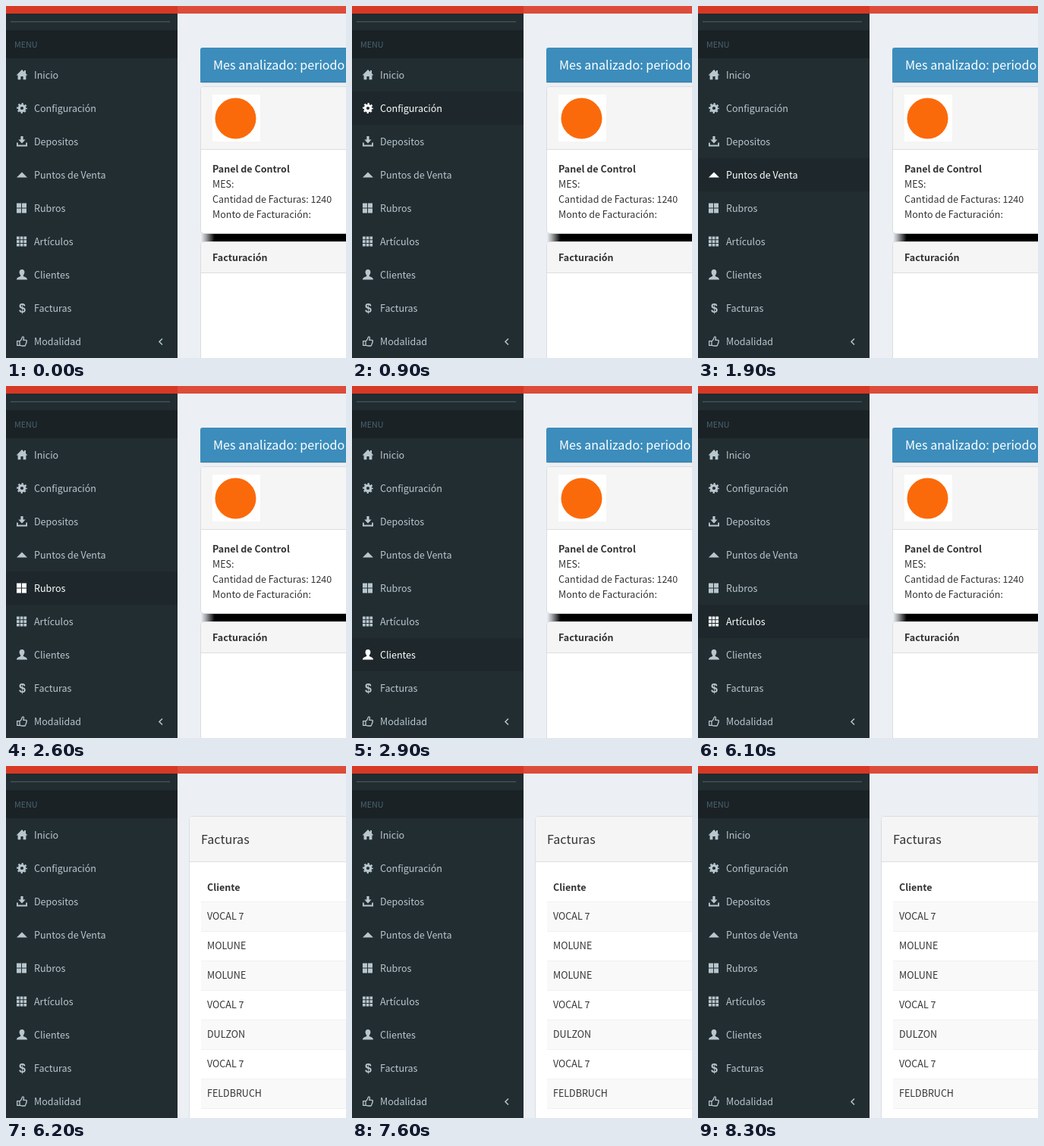
These frames come from a looping animation (448 by 465 pixels, 8500 ms). An HTML page:

```html
<!DOCTYPE html>
<html lang="es">
<head>
<meta charset="utf-8">
<title>Panel de Control</title>
<style>
  html, body { margin: 0; width: 100%; height: 100%; overflow: hidden; background: #ecf0f5; }
  svg { display: block; }
  text {
    font-family: "Noto Sans CJK JP", "Noto Sans CJK SC", "Noto Sans CJK KR", "Noto Sans CJK", "Noto Sans", sans-serif;
    fill: #333; white-space: pre;
  }
  .bold { font-weight: 700; }
  .item { color: #b8c7ce; }
  .item text { fill: currentColor; }
  .item .back { fill: none; }
  .item.on { color: #fff; }
  .item.on .back { fill: #1e282c; }
  .icon { fill: currentColor; }
  .line { fill: none; stroke: currentColor; }
  .icon .usd { font: bold 16px "Liberation Sans", Arial, sans-serif; }
</style>
</head>
<body>
<svg id="stage" width="448" height="465" viewBox="0 0 448 465">
  <defs>
    <linearGradient id="fade">
      <stop offset="0" stop-color="#ecf0f5"/>
      <stop offset=".35" stop-color="#a4a6a9"/>
      <stop offset="1" stop-color="#000"/>
    </linearGradient>
  </defs>
  <rect width="448" height="465" fill="#ecf0f5"/>
  <g id="home"></g>
  <g id="bills"></g>
  <rect width="448" height="10" fill="#dd4b39"/>
  <rect width="226" height="10" fill="#d73925"/>
  <rect y="10" width="226" height="455" fill="#222d32"/>
  <rect x="6" y="20" width="210" height="1.5" fill="#425057"/>
  <rect y="32" width="226" height="37" fill="#1a2226"/>
  <g id="menu"></g>
</svg>
<script>
const LOOP = 8500;
const BILLS_AT = 6200;
const ARROW_BACK = 6400;
const ROW = 44;

// [start in ms, hovered menu row or -1]
const HOVER = [
  [0, -1], [800, 0], [900, 1], [1700, 2], [1900, 3], [2400, 4], [2700, 5],
  [2900, 6], [3300, 7], [5100, 6], [5500, 5], [6200, -1]
];

const byId = id => document.getElementById(id);

// Latin letters of this face run 1.117 times larger than the nominal size.
const label = (x, y, str, size = 14, attrs = "") =>
  `<text x="${x}" y="${y}" font-size="${(size / 1.117).toFixed(2)}" ${attrs}>${str}</text>`;
const box = (x, y, w, h, fill, attrs = "") =>
  `<rect x="${x}" y="${y}" width="${w}" height="${h}" fill="${fill}" ${attrs}/>`;
const shape = d => `<path d="${d}"/>`;

function tiles(count, size, step) {
  let d = "";
  for (let i = 0; i < count * count; i++)
    d += `M${i % count * step} ${Math.floor(i / count) * step + .5}h${size}v${size}h${-size}z`;
  return shape(d);
}

// Icons live in a 14 by 14 square.
const ICONS = {
  house: shape("M7 0L10 3V1H12V5L14.4 7.6H12.4V13.2H8.6V9H5.4V13.2H1.6V7.6H-.4Z"),
  cog: `<circle class="line" cx="7" cy="7" r="3.7" stroke-width="3.2"/>
    <circle class="line" cx="7" cy="7" r="5.8" stroke-width="2.2" stroke-dasharray="2.278" stroke-dashoffset="1.139"/>`,
  save: shape("M5.4 0H8.6V4.6H11.6L7 9.4 2.4 4.6H5.4Z") +
    shape("M0 8.4H1.8V11.6H12.2V8.4H14V13.5H0Z"),
  up: shape("M0 10.4L7 3.4 14 10.4Z"),
  large: tiles(2, 6, 7),
  small: tiles(3, 3.7, 4.7),
  user: shape("M7 0C9.5 0 10.6 1.7 10.4 4 10.2 5.8 9.4 7 8.8 7.7V9C10.5 10 14 10.5 14 13.4H0C0 10.5 3.5 10 5.2 9V7.7C4.6 7 3.8 5.8 3.6 4 3.4 1.7 4.5 0 7 0Z"),
  usd: `<text class="usd" x="3" y="12.5">$</text>`,
  thumb: `<path class="line" stroke-width="1.3" stroke-linejoin="round"
    d="M.7 6.6H4V12.4H.7ZM4 6.8C5.6 5.8 6.4 4.4 6.9 3 7.1 1.6 7.3.8 8.1.8 9.8.8 9.8 3 8.8 5.3H12.2C13.8 5.4 13.7 7.1 12.7 7.5 13.4 8.4 13 9.4 12.3 9.7 12.6 10.6 12.2 11.2 11.6 11.5 11.7 12.6 11 13 10.2 13H7.6C6.3 13 5.4 12.4 4 12.2"/>`
};

const MENU = [
  ["Inicio", "house"], ["Configuración", "cog"], ["Depositos", "save"],
  ["Puntos de Venta", "up"], ["Rubros", "large"], ["Artículos", "small"],
  ["Clientes", "user"], ["Facturas", "usd"], ["Modalidad", "thumb"]
];

const CLIENTS = ["VOCAL 7", "MOLUNE", "MOLUNE", "VOCAL 7", "DULZON", "VOCAL 7", "FELDBRUCH"];

function panel(x, y, h, head) {
  const bottom = y + head;
  return box(x + .5, y + .5, 230, h, "#fff", 'rx="4" stroke="#d9dce0"') +
    `<path d="M${x + 1} ${bottom}V${y + 4}q0 -3 3 -3H448V${bottom}Z" fill="#f5f5f5"/>` +
    box(x + 1, bottom, 220, 1, "#ddd");
}

byId("home").innerHTML =
  box(256, 56, 210, 46, "#c9d3dc", 'rx="3"') +
  box(256, 55, 210, 46, "#3c8dbc", 'rx="3"') +
  box(256, 100, 192, 1, "#357ca5") +
  label(273, 84, "Mes analizado: periodo", 18, 'style="fill:#fff"') +
  box(257, 298, 18, 16, "url(#fade)") +
  box(275, 298, 173, 16, "#000") +
  panel(256, 106, 194, 83) +
  box(272, 117, 63, 62, "#fff") +
  '<circle cx="302.5" cy="148.5" r="27" fill="#fb6a0a"/>' +
  label(272, 220, "Panel de Control", 14, 'class="bold"') +
  ["MES:", "Cantidad de Facturas: 1240", "Monto de Facturación:"]
    .map((str, i) => label(272, 240 + 20 * i, str)).join("") +
  panel(256, 311, 180, 41) +
  label(272, 337, "Facturación", 14, 'class="bold"');

byId("bills").innerHTML =
  panel(241, 66, 420, 60) +
  label(257, 103, "Facturas", 18) +
  label(265, 165, "Cliente", 14, 'class="bold"') +
  CLIENTS.map((name, i) => {
    const y = 179 + 39 * i;
    return box(257, y, 191, 39, i % 2 ? "#fff" : "#f9f9f9") +
      box(257, y, 191, 1, "#f1f1f1") + label(265, y + 24, name);
  }).join("") +
  box(257, 452, 191, 1, "#f1f1f1");

byId("menu").innerHTML =
  label(11, 55, "MENU", 12, 'style="fill:#4b646f"') +
  MENU.map(([name, icon], i) =>
    `<g class="item" transform="translate(0 ${69 + ROW * i})">
      <rect class="back" width="226" height="${ROW}"/>
      <g class="icon" transform="translate(14 15)">${ICONS[icon]}</g>
      ${label(37, 27, name)}
    </g>`).join("") +
  '<path id="arrow" d="M206 439.5L202 443.5 206 447.5" fill="none" stroke="#b8c7ce" stroke-width="1.5"/>';

const items = [...document.querySelectorAll(".item")];
const show = (id, on) => byId(id).setAttribute("visibility", on ? "visible" : "hidden");

function draw() {
  const t = performance.now() % LOOP;
  const hovered = HOVER.filter(([start]) => start <= t).pop()[1];
  items.forEach((item, i) => item.classList.toggle("on", i === hovered));
  show("home", t < BILLS_AT);
  show("bills", t >= BILLS_AT);
  show("arrow", t < BILLS_AT || t >= ARROW_BACK);
  requestAnimationFrame(draw);
}
draw();
</script>
</body>
</html>
```
